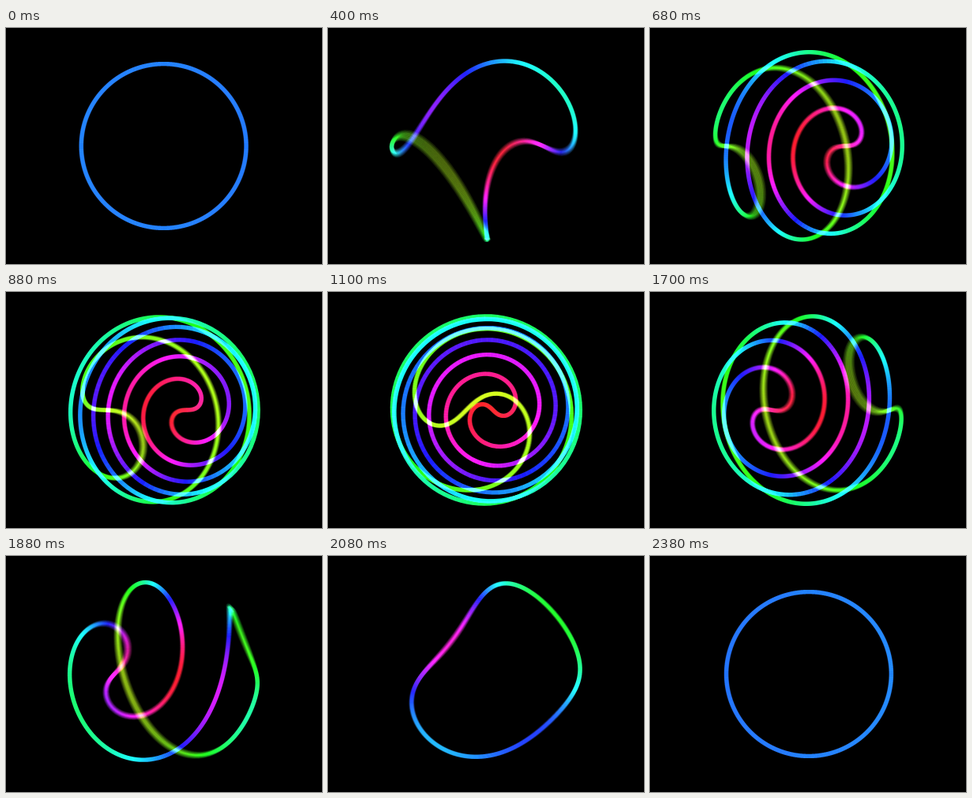
An HTML page with a canvas that plays this animation: 400x300 px, repeating every 2400 ms.

```html
<!DOCTYPE html>
<html lang="en">
<head>
<meta charset="utf-8">
<title>Twisting ring</title>
<style>
  html, body { margin: 0; width: 100%; height: 100%; overflow: hidden; background: #000; }
  canvas { display: block; width: 400px; height: 300px; }
</style>
</head>
<body>
<canvas id="stage" width="400" height="300"></canvas>
<script>
const ctx = document.getElementById('stage').getContext('2d');

const LOOP = 2400, STEP = 20;
const RADIUS = 104.4, PERSPECTIVE = 0.485, WIDTH = 5.4;
const TWIST = 3.75 * Math.PI, SEGMENTS = 960;
const SAMPLES = 8, SHUTTER = 0.6;

const ease = p => p * p * (3 - 2 * p);

// Hues from lime (near) through blue to red (far).
const palette = Array.from({ length: 289 }, (_, i) => `hsl(${72 + i}, 100%, 55%)`);
const depthColor = z => palette[Math.max(0, Math.min(288, Math.round(144 - 144 * z)))];

// A great circle twisted about its own diameter, which swings half a turn per loop.
function ringPoints(t) {
  const swing = Math.PI * t;
  const c = Math.cos(swing), s = Math.sin(swing);
  const twist = TWIST * ease(0.5 - 0.5 * Math.cos(2 * Math.PI * t));
  const points = [];
  for (let i = 0; i < SEGMENTS; i++) {
    const a = 2 * Math.PI * i / SEGMENTS;
    const h = Math.cos(a), v = Math.sin(a);
    const w = -v * Math.sin(twist * h);
    const y = v * Math.cos(twist * h);
    const z = s * h + c * w;
    const scale = RADIUS / (1 - PERSPECTIVE * z);
    points.push({ x: 200 + (s * w - c * h) * scale, y: 150 - y * scale, z });
  }
  return points;
}

// Quads share their edges, so only true crossings add up.
function drawRing(t) {
  const pts = ringPoints(t);
  const at = i => pts[(i + SEGMENTS) % SEGMENTS];
  const edges = pts.map((p, i) => {
    const a = at(i - 1), b = at(i + 1);
    const dx = b.x - a.x, dy = b.y - a.y;
    const k = WIDTH / 2 / (Math.hypot(dx, dy) || 1);
    return [p.x - dy * k, p.y + dx * k, p.x + dy * k, p.y - dx * k];
  });
  for (let i = 0; i < SEGMENTS; i++) {
    const p = edges[i], q = edges[(i + 1) % SEGMENTS];
    ctx.fillStyle = depthColor((pts[i].z + at(i + 1).z) / 2);
    ctx.beginPath();
    ctx.moveTo(p[0], p[1]);
    ctx.lineTo(q[0], q[1]);
    ctx.lineTo(q[2], q[3]);
    ctx.lineTo(p[2], p[3]);
    ctx.fill();
  }
}

function render(step) {
  ctx.globalCompositeOperation = 'source-over';
  ctx.globalAlpha = 1;
  ctx.fillStyle = '#000';
  ctx.fillRect(0, 0, 400, 300);
  ctx.globalCompositeOperation = 'lighter';
  ctx.globalAlpha = 1 / SAMPLES;
  for (let i = 0; i < SAMPLES; i++) {
    drawRing((step + SHUTTER * i / SAMPLES) * STEP / LOOP);
  }
}

const start = performance.now();
let shown = -1;

function tick() {
  const time = (performance.now() - start + 1) % LOOP;
  const step = Math.floor(time / STEP);
  if (step !== shown) render(shown = step);
  requestAnimationFrame(tick);
}
tick();
</script>
</body>
</html>
```
